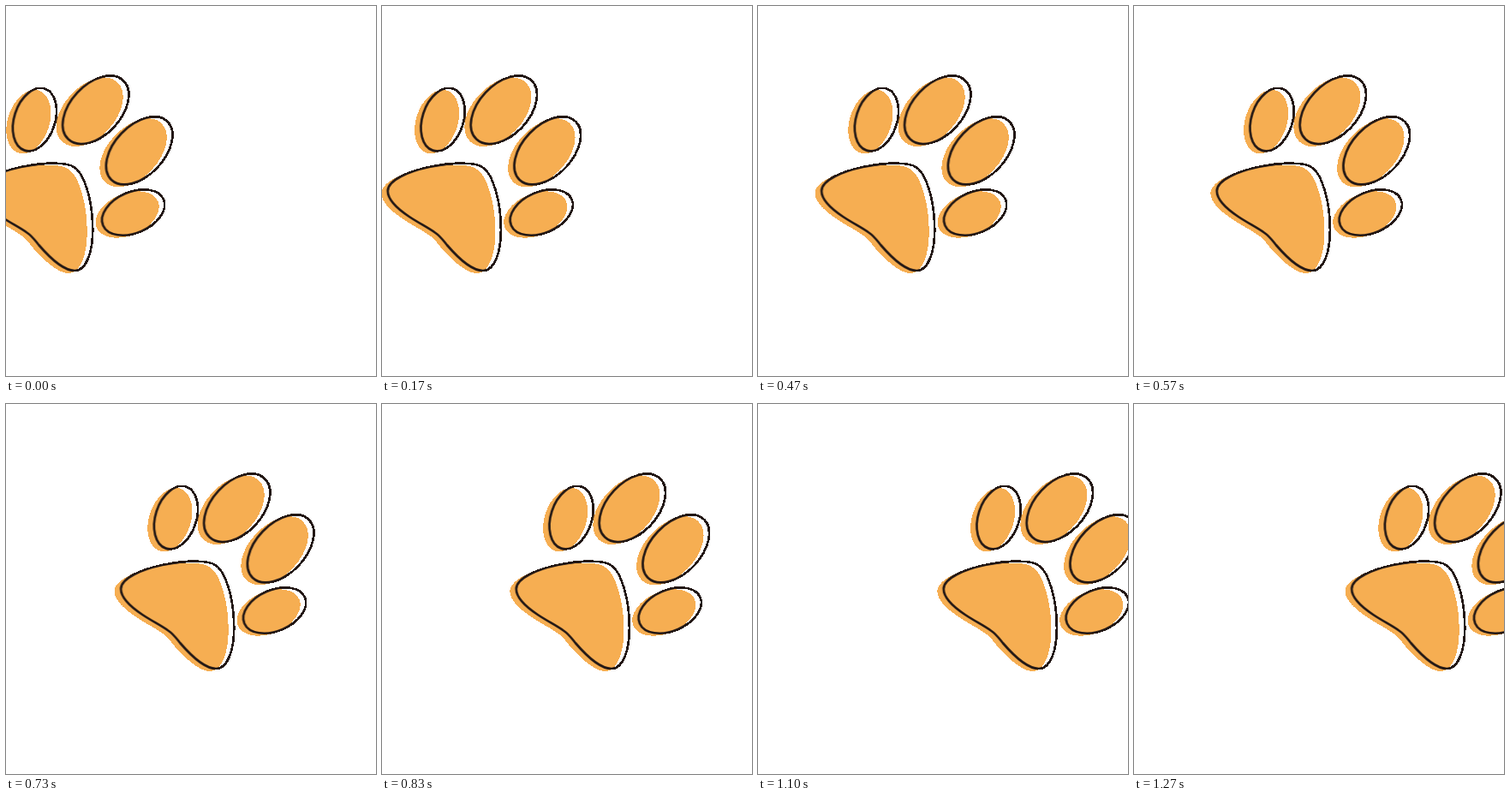
These frames come from a looping animation (432 px wide and 432 px high, 1.31 s). An HTML page:

```html
<!DOCTYPE html>
<html lang="en">
<head>
<meta charset="utf-8">
<title>Paw</title>
<style>
  html, body { margin: 0; width: 100%; height: 100%; overflow: hidden; background: #fff; }
  svg { display: block; width: 100vw; height: 100vh; }
  .fill { fill: #f6ae52; stroke: #f6ae52; stroke-width: .9; }
  .line { fill: none; stroke: #231815; stroke-width: 2.7; stroke-linejoin: round; }
</style>
</head>
<body>
<svg viewBox="0 0 432 432">
  <defs>
    <!-- Hard outer edge; lines over the fill stay smooth. -->
    <filter id="cutout" filterUnits="userSpaceOnUse" x="0" y="0" width="432" height="432"
      color-interpolation-filters="sRGB">
      <feComponentTransfer><feFuncA type="discrete" tableValues="0 1"/></feComponentTransfer>
    </filter>
    <g id="shape">
      <ellipse rx="23.9" ry="37.9" transform="translate(161.2 132.6) rotate(18)"/>
      <ellipse rx="29.4" ry="47" transform="translate(232.5 121.2) rotate(43)"/>
      <ellipse rx="29" ry="47.2" transform="translate(283.4 168.8) rotate(43.7)"/>
      <ellipse rx="38.5" ry="23.9" transform="translate(276.4 241) rotate(-23.3)"/>
      <path d="M96.9 216C96.9 203 122 193 145 188C160 185 178 183 192 184
        C204 185 211 188 217 200C225 217 229 238 229 262C229 286 222 309 208 309
        C195 309 178 293 166 279C160 271.5 158 268.5 152 264.5
        C143 258 134 254 122 246C107 236 96.9 226 96.9 216Z"/>
    </g>
  </defs>
  <g filter="url(#cutout)">
    <g id="paw">
      <use href="#shape" class="fill" x="-7" y="2.5"/>
      <use href="#shape" class="line"/>
    </g>
  </g>
</svg>
<script>
  const LOOP = 1310, STEPS = 39, STRIDE = 7.5, START = -127.7;

  // Thirty steps a second, each landing on a whole hundredth of a second.
  const stepTime = k => Math.round(k * 10 / 3) * 10;
  const pose = (k, offset) => ({
    offset,
    transform: `translateX(${START + k * STRIDE}px)`,
    easing: 'steps(1, end)'
  });

  const frames = Array.from({ length: STEPS }, (_, k) => pose(k, stepTime(k) / LOOP));
  frames.push(pose(STEPS - 1, 1));

  document.getElementById('paw').animate(frames, { duration: LOOP, iterations: Infinity });
</script>
</body>
</html>
```
